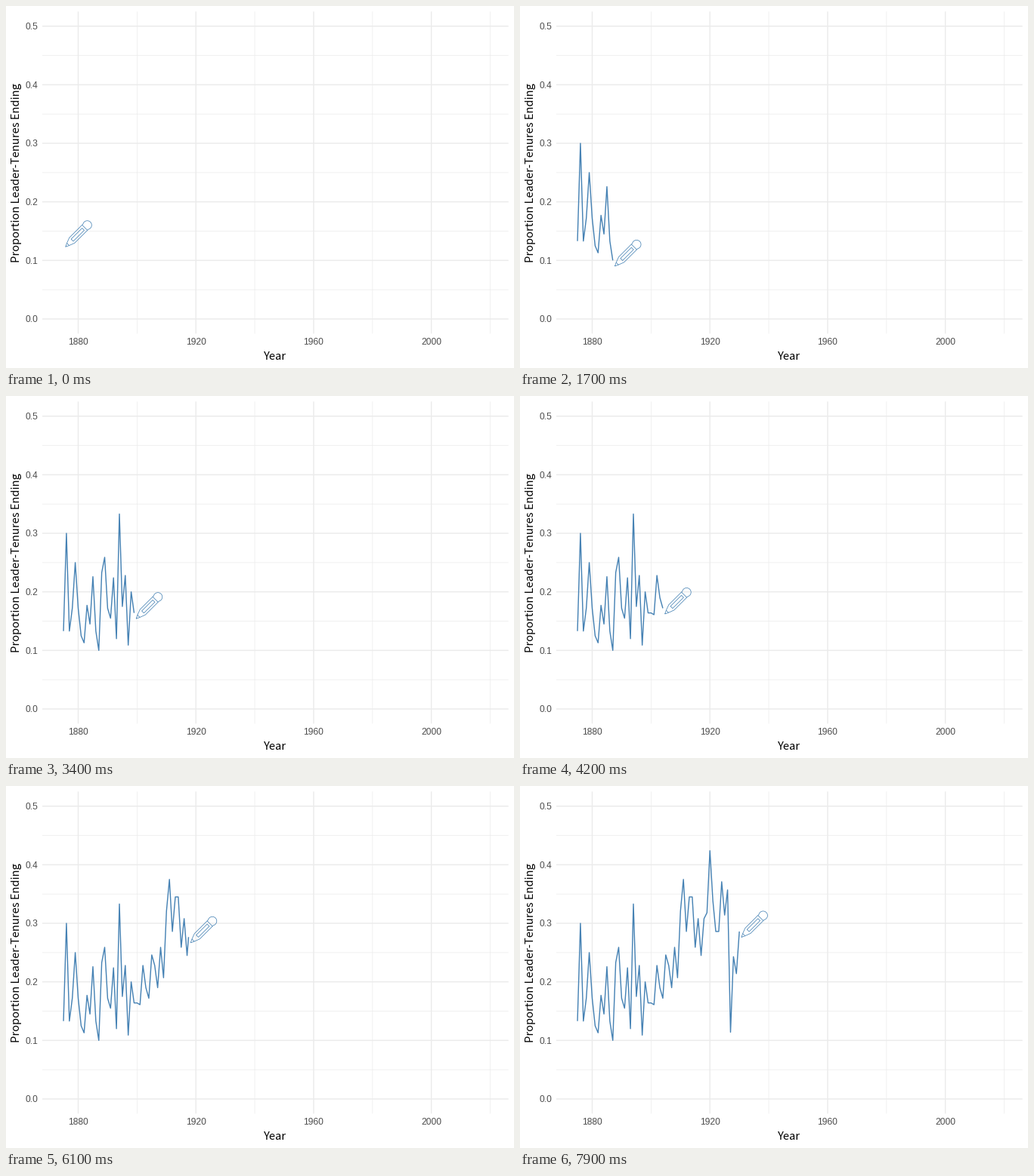
Write a matplotlib script that moves like this. It is 672 px wide and 480 px high and loops after 8 s.

```python
import numpy as np
import matplotlib.pyplot as plt
from matplotlib.animation import FuncAnimation

W, H, DPI = 672, 480, 96
PX = 72 / DPI                                  # one pixel in points
LEFT, RIGHT, TOP, BOTTOM = 48, 664.67, 7.33, 434.4
BLUE, GRID = "#4682B4", "#EBEBEB"
FRAMES, INTERVAL = 80, 100

START = 1875
RATES = np.array([
    .133, .300, .133, .172, .250, .172, .125, .113, .177, .145,
    .226, .133, .100, .233, .259, .172, .155, .224, .120, .333,
    .175, .228, .109, .200, .164, .164, .161, .228, .190, .172,
    .246, .228, .190, .259, .207, .321, .375, .286, .345, .345,
    .259, .308, .245, .308, .318, .424, .339, .286, .286, .371,
    .314, .357, .114, .243, .214, .286])
YEARS = START + np.arange(len(RATES))
# Each year lands on a whole frame; 139 years would fill 200 frames
ARRIVAL = np.round(np.arange(len(RATES)) * 199 / 139)


def px(year):
    return LEFT + (year - 1867.8) / 158.4 * (RIGHT - LEFT)


def py(rate):
    return BOTTOM - (rate + 0.025) / 0.55 * (BOTTOM - TOP)


fig = plt.figure(figsize=(W / DPI, H / DPI), dpi=DPI, facecolor="white")
ax = fig.add_axes([0, 0, 1, 1])
ax.set_xlim(0, W)
ax.set_ylim(H, 0)
ax.axis("off")


def stroke(x, y, color, width, **kw):
    return ax.plot(x, y, color=color, lw=width * PX, snap=False,
                   solid_capstyle="butt", solid_joinstyle="round", **kw)[0]


def vgrid(year, width):
    stroke([px(year)] * 2, [TOP, BOTTOM], GRID, width)


def hgrid(rate, width):
    stroke([LEFT, RIGHT], [py(rate)] * 2, GRID, width)


def label(x, y, text, size, color, font, **kw):
    ax.text(x, y, text, fontsize=size, color=color, family=font,
            va="baseline", **kw)


# Grid: minor lines below major ones
for year in range(1900, 2021, 40):
    vgrid(year, 0.71)
for k in range(5):
    hgrid(0.05 + k / 10, 0.71)
for year in range(1880, 2001, 40):
    vgrid(year, 1.42)
    label(px(year), 449.3, str(year), 9, "#4D4D4D", "Liberation Sans",
          ha="center")
for k in range(6):
    hgrid(k / 10, 1.42)
    label(42.4, py(k / 10) + 4.2, f"{k / 10:.1f}", 9, "#4D4D4D",
          "Liberation Sans", ha="right")

label((LEFT + RIGHT) / 2, 468.8, "Year", 11, "black", "Noto Sans CJK JP",
      ha="center")
label(18.2, (TOP + BOTTOM) / 2, "Proportion Leader-Tenures Ending", 11,
      "black", "Noto Sans CJK JP", ha="center", rotation=90,
      rotation_mode="anchor")


def pencil_parts():
    """Outlines as (along, across) points measured from the tip."""
    a = np.linspace(-1, 1, 30) * (np.pi - np.arcsin(5 / 5.8))
    cap = np.column_stack([40.7 + 5.8 * np.cos(a), 5.8 * np.sin(a)])
    body = np.vstack([[(0, 0), (4.7, -2.2), (12.2, -5)], cap,
                      [(12.2, 5), (4.7, 2.2), (0, 0)]])
    lead = np.array([(4.7, -2.2), (4.7, 2.2)])
    ferrule = np.array([(36, -5), (36, 5)])
    panel = np.array([(12.5, -2), (33, -2), (33, 2), (12.5, 2), (12.5, -2)])
    return body, lead, ferrule, panel


def tilt(part):
    u, v = part.T / np.sqrt(2)
    return u + v + 2.7, v - u + 7.6


trace = stroke([], [], BLUE, 1.42)
shapes = [tilt(p) for p in pencil_parts()]
pencil = [stroke([], [], BLUE, 0.75) for _ in shapes]


def update(i):
    year = np.interp(i, ARRIVAL, YEARS)
    rate = np.interp(year, YEARS, RATES)
    done = YEARS < year
    x, y = px(year), py(rate)
    trace.set_data(np.append(px(YEARS[done]), x),
                   np.append(py(RATES[done]), y))
    for line, (dx, dy) in zip(pencil, shapes):
        line.set_data(x + dx, y + dy)
    return [trace, *pencil]


anim = FuncAnimation(fig, update, frames=FRAMES, interval=INTERVAL,
                     init_func=lambda: update(0), repeat=True,
                     repeat_delay=0, blit=False)
plt.show()
```
